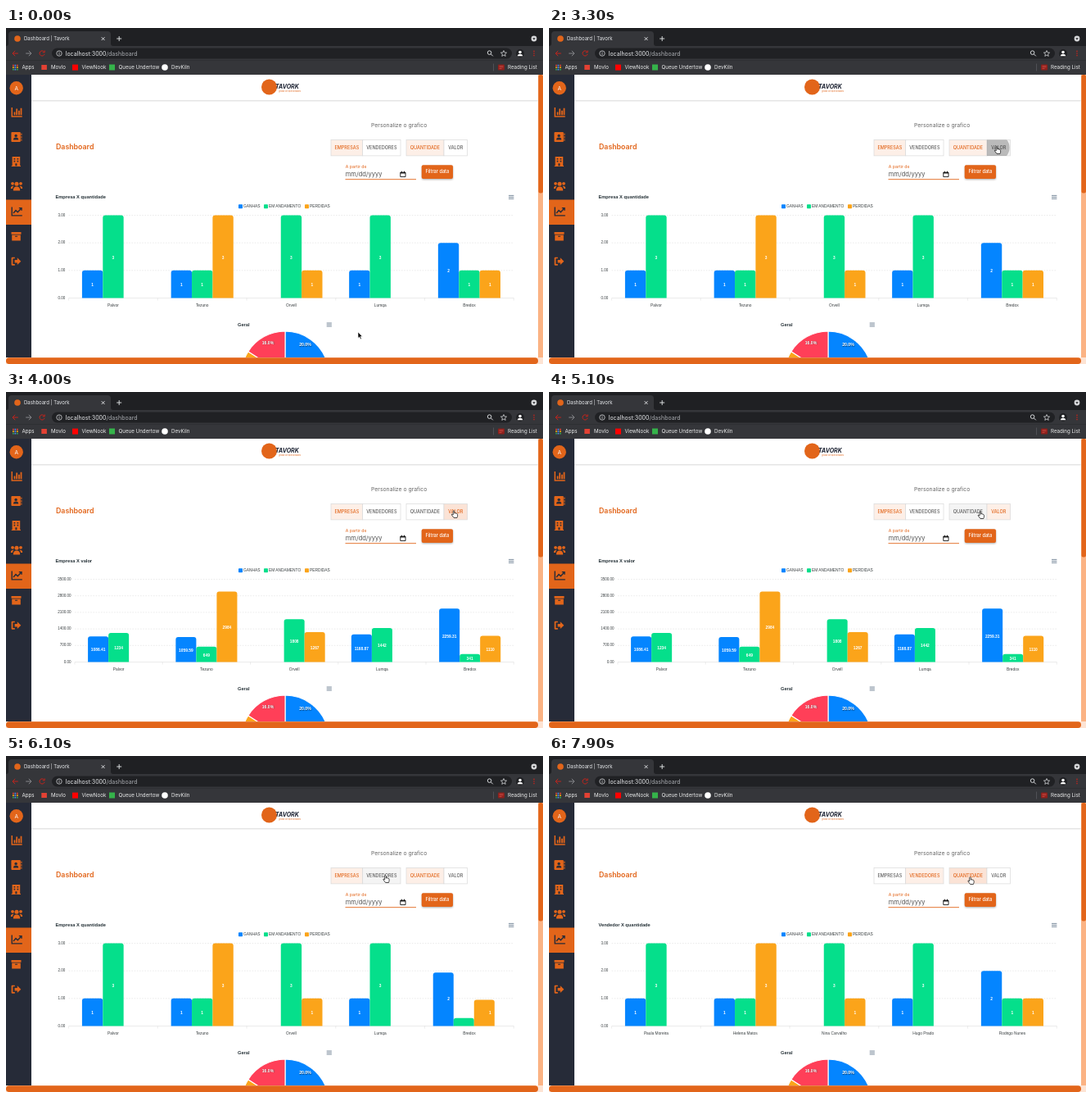
These frames come from a looping animation (656x410 px, 8000 ms). An HTML page:

```html
<!DOCTYPE html>
<html lang="pt">
<head>
<meta charset="utf-8">
<title>Dashboard</title>
<style>
html, body { margin: 0; width: 100%; height: 100%; overflow: hidden; background: #fff; }
svg { display: block; width: 656px; height: 410px; }
text { font-family: Inter, Roboto, sans-serif; }
.chart text { font-family: "Liberation Sans", Arial, sans-serif; font-size: 4.85px; fill: #373d3f; }
.chart .title { font-size: 5.7px; font-weight: 700; fill: #263238; }
.chart .tick { font-size: 4.5px; text-anchor: end; }
.chart .cat { text-anchor: middle; }
.chart .value { font-weight: 700; fill: #fff; text-anchor: middle; }
.chart .slice { font-size: 5.2px; font-weight: 700; fill: #fff; text-anchor: middle; text-shadow: .4px .5px .8px #0008; }
.mark text { font-size: 6.2px; fill: #eceded; }
.btn text { font-size: 5.5px; font-weight: 500; text-anchor: middle; }
</style>
</head>
<body>
<svg viewBox="0 0 656 410">
  <defs>
    <filter id="soft" x="-5%" y="-60%" width="110%" height="260%"><feGaussianBlur stdDeviation="1.1"/></filter>
    <clipPath id="page"><rect x="31" y="57" width="619" height="345"/></clipPath>
  </defs>

  <!-- browser frame -->
  <rect width="656" height="26" fill="#1f2023"/>
  <path d="M0 22Q3 22 3 19V8Q3 4 7 4H124Q128 4 128 8V19Q128 22 131 22H656V57H0Z" fill="#35363a"/>
  <rect x="56" y="24.5" width="562" height="13" rx="6.5" fill="#202124"/>
  <path d="M0 39.5H656" stroke="#2b2c2f" stroke-width=".6"/>
  <circle cx="14" cy="13" r="3.8" fill="#e2651a"/>
  <text x="22" y="15.2" font-size="6" fill="#e8eaed">Dashboard | Tavork</text>
  <g fill="none" stroke="#e8eaed" stroke-width=".9">
    <path d="M116.7 11.2l3.8 3.8m0-3.8l-3.8 3.8M135.2 13h6M138.2 10v6"/>
    <circle cx="65" cy="31" r="3.2" stroke-width=".7"/><path d="M65 30.5v2.2M65 28.9v.8" stroke-width=".8"/>
    <circle cx="590.6" cy="30.1" r="2.3"/><path d="M592.4 31.9l2.4 2.4"/>
    <path d="M608 27.5l1 2.4 2.6.2-2 1.7.6 2.6-2.2-1.4-2.2 1.4.6-2.6-2-1.7 2.6-.2z" stroke-width=".7"/>
  </g>
  <circle cx="645" cy="13" r="3.4" fill="#d8d9db"/><path d="M643.3 12.2h3.4l-1.7 2.2z" fill="#202124"/>
  <g fill="none" stroke="#c3241c" stroke-width="1">
    <path d="M14.8 31H8M11.2 27.8L8 31l3.2 3.2"/>
    <path d="M24.2 31H31M27.8 27.8L31 31l-3.2 3.2" stroke="#85868a"/>
    <path d="M46.7 29.2a3.1 3.1 0 1 0 .4 2.6M47.2 27.4v2.4h-2.4"/>
  </g>
  <circle cx="628" cy="31" r="5" fill="#202124"/>
  <path d="M624.8 34.3q0-2.5 3.2-2.5t3.2 2.5z" fill="#fff"/><circle cx="628" cy="29.5" r="1.8" fill="#fff"/>
  <g fill="#c3241c"><circle cx="645" cy="28.4" r=".8"/><circle cx="645" cy="31" r=".8"/><circle cx="645" cy="33.6" r=".8"/></g>
  <text x="72.7" y="33.5" font-size="7.05" fill="#e8eaed">localhost:3000<tspan fill="#a9acb1">/dashboard</tspan></text>
  <g class="mark">
    <g id="apps"></g>
    <text x="19.5" y="50.3">Apps</text>
    <rect x="43.3" y="45" width="6.6" height="6" fill="#e34133"/><text x="55" y="50.3">Movlo</text>
    <rect x="81" y="44.6" width="7" height="7" fill="#f00"/><text x="92.5" y="50.3">ViewNook</text>
    <rect x="126" y="44.5" width="7" height="7" fill="#35b34a"/><text x="137.6" y="50.3">Queue Undertow</text>
    <circle cx="194" cy="48" r="3.8" fill="#fff"/><text x="202" y="50.3">DevKiln</text>
    <path d="M595.5 43.5v9" stroke="#5c5e63" stroke-width=".7"/>
    <rect x="601" y="44.5" width="8" height="7" rx="1" fill="#8c201c"/><path d="M602.5 46.5h5M602.5 48h5M602.5 49.6h3" stroke="#d8564e" stroke-width=".6"/>
    <text x="613" y="50.3">Reading List</text>
  </g>

  <!-- page -->
  <rect x="31" y="57" width="619" height="345" fill="#fff"/>
  <g clip-path="url(#page)">
    <rect x="31" y="86" width="619" height="2.6" fill="#0003" filter="url(#soft)"/>
    <rect x="31" y="57" width="619" height="31" fill="#fff"/>
    <circle cx="321.5" cy="72" r="9.5" fill="#e2651a"/>
    <text x="329" y="74.4" font-size="7" font-weight="700" font-style="italic" fill="#1d2333">TAVORK</text>
    <text x="333" y="77.6" font-size="2.3" fill="#e2651a">gestao de oportunidades</text>
    <text x="61" y="147.8" font-size="8.8" font-weight="600" fill="#e2651a">Dashboard</text>
    <text x="446" y="120.6" font-size="6.85" fill="#666">Personalize o grafico</text>
    <g id="buttons"></g>
    <text x="414.8" y="171" font-size="5.2" fill="#e2651a">A partir de</text>
    <text x="414.8" y="180.6" font-size="7.5" fill="#555">mm/dd/yyyy</text>
    <path d="M414.5 184.7H501" stroke="#e2651a" stroke-width=".9"/>
    <path d="M481.8 176.2h6.2v5.4h-6.2zM483.3 174.7v1.8M486.5 174.7v1.8" fill="none" stroke="#111" stroke-width=".9"/>
    <path d="M481.8 176.8h6.2" stroke="#111" stroke-width="1.4"/>
    <rect x="508" y="168.5" width="38" height="16.5" rx="2" fill="#0005" filter="url(#soft)"/>
    <rect x="507.7" y="167.2" width="38.3" height="16.8" rx="2" fill="#e2651a"/>
    <text x="526.8" y="177.2" font-size="5.6" font-weight="500" fill="#fff" text-anchor="middle">Filtrar data</text>
    <g class="chart">
      <text id="title" class="title" x="60.5" y="208.2"></text>
      <g id="legend"></g>
      <g id="axes"></g>
      <g id="bars"></g>
      <g id="values"></g>
      <text class="title" x="283" y="364">Geral</text>
      <g id="pie" stroke="#fff" stroke-width="1.1"></g>
      <text class="slice" x="365.5" y="388.2">20.0%</text>
      <text class="slice" x="320" y="385.6">16.0%</text>
      <path d="M614 204.4h6.4M614 206.4h6.4M614 208.4h6.4M391.7 360h6.2M391.7 362h6.2M391.7 364h6.2" stroke="#6e8192" stroke-width=".9"/>
    </g>
  </g>

  <!-- sidebar -->
  <rect y="57" width="31" height="345" fill="#262b38"/>
  <rect y="209.5" width="31" height="30.5" fill="#e2651a"/>
  <circle cx="12.7" cy="73.3" r="8.2" fill="#e2651a"/>
  <text x="12.7" y="75.7" font-size="6.5" fill="#fff" text-anchor="middle">A</text>
  <g fill="#e2651a">
    <path d="M6.5 97h1.5v10.3h11.7v1.5H6.5zM9.6 102.5h1.8v3.8h-1.8zM12.3 98.5h1.8v7.8h-1.8zM15 100.8h1.8v5.5h-1.8zM17.6 97.8h1.8v8.5h-1.8z"/>
    <path d="M7.4 127h9.4q1 0 1 1v10q0 1-1 1H7.4q-1 0-1-1v-10q0-1 1-1zM18.4 128.6h1v2.4h-1zM18.4 132h1v2.4h-1zM18.4 135.4h1v2.4h-1z"/>
    <path d="M7.6 157h9.6v11h.8v1H6.7v-1h.9z"/>
    <circle cx="8" cy="189.8" r="1.9"/><circle cx="18" cy="189.8" r="1.9"/><circle cx="13" cy="190.3" r="2.5"/>
    <path d="M5.8 196q0-3.5 3.8-3.3-1.6 1.4-1.6 3.3zM20.2 196q0-3.5-3.8-3.3 1.6 1.4 1.6 3.3zM8.8 198.6q0-5 4.2-5t4.2 5z"/>
    <path d="M6.5 249h12v2.8h-12zM7.2 252.6h10.6v7H7.2z"/>
    <path d="M10.8 279.7H7.6q-1 0-1 1v8q0 1 1 1h3.2v-1.6H8.4v-6.8h2.4zM10.6 283h3.2v-2.7l4.5 4.4-4.5 4.4v-2.7h-3.2z"/>
  </g>
  <g fill="#262b38">
    <circle cx="12.1" cy="131.4" r="1.7"/><path d="M9 136.4q0-2.8 3.1-2.8t3.1 2.8z"/>
    <path d="M9.6 159h1.6v1.6H9.6zM13.6 159h1.6v1.6h-1.6zM9.6 161.8h1.6v1.6H9.6zM13.6 161.8h1.6v1.6h-1.6zM11.4 165.2h2v3h-2zM11 253.8h3v1h-3z"/>
  </g>
  <path d="M7.2 218.5v10.4h12.6M9 226l3-3.4 2.3 2.2 4.6-5M15.8 219.6h3.2v3.2" fill="none" stroke="#262b38" stroke-width="1.4"/>

  <!-- scrollbars -->
  <rect x="650" y="57" width="6" height="353" fill="#fbb384"/>
  <rect x="650.4" y="57" width="5.6" height="144.5" rx="2.5" fill="#e2651a"/>
  <rect y="402" width="656" height="8" fill="#fde3d3"/>
  <rect y="402.3" width="650" height="7.7" rx="3.8" fill="#e2651a"/>

  <g id="cursor">
    <path id="arrow" d="M0 0V7.4l1.7-1.5 1.3 2.9 1.3-.6-1.3-2.8h2.3z" fill="#000" stroke="#fff" stroke-width=".6"/>
    <path id="hand" d="M-.8.8Q0-.5.8.8V3.6l.7-.4.9.2.9.3.9.4.4.9V7l-.7 2H.1L-2.6 5.4Q-2.8 4.2-1.6 4.6L-.8 5.4Z" fill="#fff" stroke="#000" stroke-width=".7" stroke-linejoin="round"/>
  </g>
</svg>
<script>
const LOOP = 8000, BASE = 329.5, HEIGHT = 101, RIGHT = 620.3;
const ORANGE = '#e2651a', COLORS = ['#0485ff', '#05df8b', '#fba41a'];
const $ = id => document.getElementById(id);
const clamp = v => Math.max(0, Math.min(1, v));
const smooth = v => v * v * (3 - 2 * v);
const mix = (a, b, p) => a + (b - a) * p;

function add(parent, tag, attrs, text) {
  const el = document.createElementNS('http://www.w3.org/2000/svg', tag);
  for (const k in attrs) el.setAttribute(k, attrs[k]);
  if (text !== undefined) el.textContent = text;
  parent.appendChild(el);
  return el;
}

const count = { x0: 76.6, max: 3, ticks: 3, rows: [[1, 3, 0], [1, 1, 3], [0, 3, 1], [1, 3, 0], [2, 1, 1]] };
const money = { x0: 84, max: 3500, ticks: 5, rows: [[1086.41, 1234, 0], [1059.59, 649, 2984], [0, 1808, 1267], [1168.87, 1442, 0], [2259.31, 341, 1110]] };
const firms = ['Palvor', 'Tezuno', 'Orvell', 'Lumqa', 'Bredox'];
const sellers = ['Paula Moreira', 'Helena Matos', 'Nina Carvalho', 'Hugo Prado', 'Rodrigo Nunes'];

// bars of group j morph at start + j * step
const views = [
  { at: 0, data: count, from: count, names: firms, title: 'Empresa X quantidade', start: 0, step: 0, dur: 1 },
  { at: 3480, data: money, from: count, names: firms, title: 'Empresa X valor', start: 3550, step: 70, dur: 150 },
  { at: 5500, data: count, from: money, names: firms, title: 'Empresa X quantidade', start: 5610, step: 125, dur: 110 },
  { at: 6550, data: count, from: count, names: sellers, title: 'Vendedor X quantidade', start: 6550, step: 0, dur: 1 }
];

const path = [
  [0, 430, 371], [700, 430, 371], [1400, 425, 169], [1600, 425, 169], [1900, 455.5, 150], [2500, 462, 149],
  [2700, 462, 149], [3100, 547, 144.5], [4900, 547, 144.5], [5300, 507, 146.5], [5750, 507, 146.5],
  [6100, 463.5, 145.5], [7500, 463.5, 145.5], [7900, 514.5, 147.5], [LOOP, 514.5, 147.5]
];

const buttons = [
  { x: 397, w: 38.7, label: 'EMPRESAS', on: t => t < 6500 },
  { x: 435.7, w: 46.3, label: 'VENDEDORES', on: t => t >= 6500, press: [6400] },
  { x: 489, w: 46, label: 'QUANTIDADE', on: t => t < 3380 || t >= 5440, press: [5350] },
  { x: 535, w: 28.6, label: 'VALOR', on: t => t >= 3380 && t < 5440, press: [3130] }
];
const TOP = 136.5, TALL = 19.4;

buttons.forEach((b, i) => {
  const g = add($('buttons'), 'g', { class: 'btn' });
  const box = { x: b.x, y: TOP, width: b.w, height: TALL };
  add(add(g, 'clipPath', { id: 'clip' + i }), 'rect', box);
  b.bg = add(g, 'rect', { ...box, stroke: '#d9d9d9', 'stroke-width': .7 });
  b.text = add(g, 'text', { x: b.x + b.w / 2, y: 148.1 }, b.label);
  b.ripple = add(g, 'circle', { 'clip-path': `url(#clip${i})` });
});

['#e94235', '#f9ab00', '#34a853'].forEach((c, r) => {
  for (let i = 0; i < 3; i++) add($('apps'), 'rect', { x: 8 + i * 2.5, y: 44.8 + r * 2.5, width: 1.7, height: 1.7, fill: i === 1 ? '#4c8bf5' : c });
});

[['GANHAS', 284], ['EM ANDAMENTO', 315], ['PERDIDAS', 365]].forEach(([name, x], i) => {
  add($('legend'), 'rect', { x, y: 215.2, width: 5, height: 5, rx: .8, fill: COLORS[i] });
  add($('legend'), 'text', { x: x + 6, y: 219.4 }, name);
});

const CX = 341, CY = 423.5, R = 53.5;
[[0, .2, COLORS[0]], [.2, .55, COLORS[1]], [.55, .84, COLORS[2]], [.84, 1, '#ff3f58']].forEach(([a, b, fill]) => {
  const point = v => `${CX + R * Math.sin(v * 2 * Math.PI)} ${CY - R * Math.cos(v * 2 * Math.PI)}`;
  add($('pie'), 'path', { d: `M${CX} ${CY}L${point(a)}A${R} ${R} 0 0 1 ${point(b)}Z`, fill });
});

const bars = [];
for (let j = 0; j < 5; j++) for (let i = 0; i < 3; i++) bars.push({ j, i, el: add($('bars'), 'path', { fill: COLORS[i] }) });

// bar geometry relative to the grid's left edge
function shape(data, j, i) {
  const step = (RIGHT - data.x0) / 5, w = step * .7 / 3;
  return [step * (j + .15) + w * i, w, data.rows[j][i] / data.max * HEIGHT];
}

function barPath(x, w, h) {
  if (h < .2) return '';
  const r = Math.min(3, h);
  return `M${x} ${BASE}v${r - h}q0 ${-r} ${r} ${-r}h${w - 2 * r}q${r} 0 ${r} ${r}v${h - r}z`;
}

let shown;
function showView(v) {
  if (v === shown) return;
  shown = v;
  const { x0, max, ticks } = v.data, axes = $('axes'), step = (RIGHT - x0) / 5;
  $('title').textContent = v.title;
  axes.replaceChildren();
  $('values').replaceChildren();
  for (let k = 0; k <= ticks; k++) {
    const y = BASE - HEIGHT * k / ticks;
    add(axes, 'path', { d: `M${x0} ${y}H${RIGHT}`, stroke: '#dedede', 'stroke-width': .6, 'stroke-dasharray': k ? '1.6 1.6' : 'none' });
    add(axes, 'text', { class: 'tick', x: x0 - 4.4, y: y + 1.1 }, (max * k / ticks).toFixed(2));
  }
  for (let j = 0; j <= 5; j++) add(axes, 'path', { d: `M${x0 + j * step} ${BASE}v3`, stroke: '#dedede', 'stroke-width': .6 });
  v.names.forEach((n, j) => add(axes, 'text', { class: 'cat', x: x0 + (j + .5) * step, y: 339.8 }, n));
  for (const { j, i } of bars) {
    const [x, w, h] = shape(v.data, j, i);
    if (h) add($('values'), 'text', { class: 'value', x: x0 + x + w / 2, y: BASE - h / 2 + 2.6 }, v.data.rows[j][i]);
  }
}

function cursorAt(t) {
  const k = path.findIndex((p, n) => n && t <= p[0]);
  const a = path[k - 1], b = path[k], p = smooth((t - a[0]) / (b[0] - a[0]));
  return [mix(a[1], b[1], p), mix(a[2], b[2], p)];
}

function drawButton(b, t, x, y) {
  const on = b.on(t), hover = x > b.x && x < b.x + b.w && y > TOP && y < TOP + TALL;
  b.bg.setAttribute('fill', on ? (hover ? '#fbe3d6' : '#fdefe7') : (hover ? '#f4f4f4' : '#fff'));
  b.text.setAttribute('fill', on ? ORANGE : '#5c5c5c');
  let r = 0, alpha = 0;
  const start = b.press && b.press[0], age = t - start;
  if (b.press && age >= 0 && age < 750) {
    const [cx, cy] = cursorAt(start);
    r = (b.w / 2 + 8) * (1 - (1 - clamp(age / 380)) ** 2);
    alpha = .3 * (1 - smooth(clamp((age - 300) / 420)));
    b.ripple.setAttribute('cx', cx);
    b.ripple.setAttribute('cy', cy + 1.5);
    b.ripple.setAttribute('fill', on ? ORANGE : '#333');
  }
  b.ripple.setAttribute('r', r);
  b.ripple.setAttribute('opacity', alpha);
  return hover;
}

function draw(t) {
  const v = views.filter(s => t >= s.at).pop();
  showView(v);
  for (const { j, i, el } of bars) {
    const p = smooth(clamp((t - v.start - j * v.step) / v.dur));
    const a = shape(v.from, j, i), b = shape(v.data, j, i);
    const [x, w, h] = a.map((n, k) => mix(n, b[k], p));
    el.setAttribute('d', barPath(v.data.x0 + x, w, h));
  }
  const [x, y] = cursorAt(t);
  const hover = buttons.map(b => drawButton(b, t, x, y)).some(Boolean);
  $('cursor').setAttribute('transform', `translate(${x} ${y})`);
  $('hand').style.display = hover ? '' : 'none';
  $('arrow').style.display = hover ? 'none' : '';
}

const begin = performance.now();
function tick() {
  draw((performance.now() - begin) % LOOP);
  requestAnimationFrame(tick);
}
tick();
</script>
</body>
</html>
```
